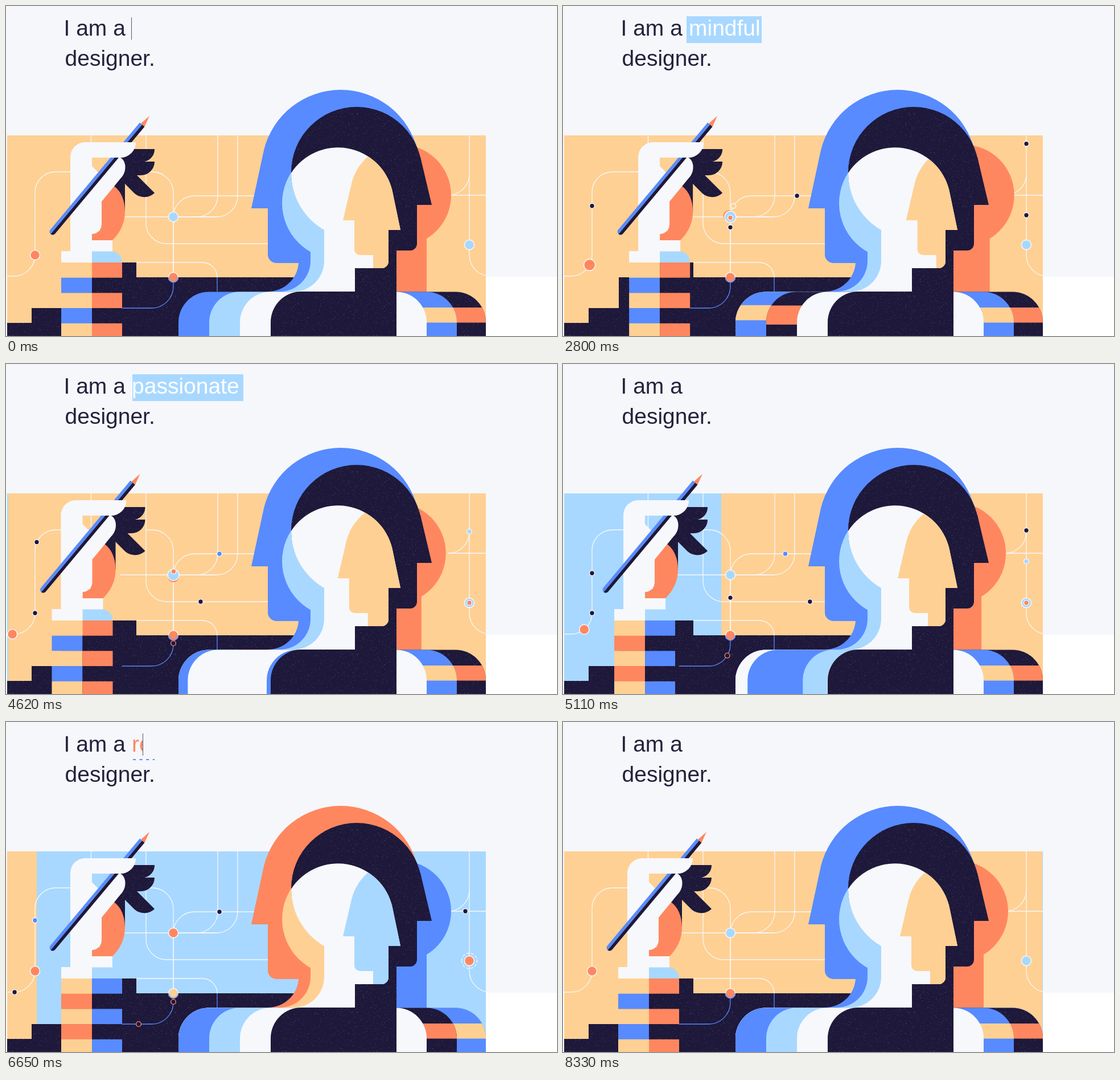
Animation of 968 by 579 pixels, one loop 8400 ms. Source, as an HTML page with a canvas:

```html
<!DOCTYPE html>
<html lang="en">
<head>
<meta charset="utf-8">
<title>I am a designer.</title>
<style>
html, body { margin: 0; width: 100%; height: 100%; overflow: hidden; background: #fff; }
canvas { display: block; }
</style>
</head>
<body>
<canvas id="stage" width="968" height="579"></canvas>
<script>
const ctx = document.getElementById('stage').getContext('2d');
const PAPER = '#f6f7fb', WHITE = '#f6f8fc', NAVY = '#1e183a', BLUE = '#578bff';
const CORAL = '#ff875f', PEACH = '#ffd093', SKY = '#a8d8ff';
const LOOP = 8400, STEP = 70;

const DAY = { bg: PEACH, hair: BLUE, head: SKY, back: CORAL, sleeve: [PEACH, BLUE, CORAL], nodes: [CORAL, SKY, CORAL, SKY] };
const SEA = { bg: SKY, hair: CORAL, head: PEACH, back: BLUE, sleeve: [PEACH, CORAL, BLUE], nodes: [CORAL, CORAL, PEACH, CORAL] };

// Navy with a light speckle
const GRAIN = (() => {
  const tile = document.createElement('canvas');
  tile.width = tile.height = 160;
  const g = tile.getContext('2d');
  let seed = 7;
  const rnd = () => (seed = (seed * 16807) % 2147483647) / 2147483647;
  g.fillStyle = NAVY;
  g.fillRect(0, 0, 160, 160);
  for (let i = 0; i < 1100; i++) {
    g.fillStyle = `rgba(205,190,205,${0.06 + rnd() * 0.2})`;
    g.fillRect(Math.floor(rnd() * 160), Math.floor(rnd() * 160), 1, 1);
  }
  return ctx.createPattern(tile, 'repeat');
})();

const linear = u => u;
const quad = u => u < 0.5 ? 2 * u * u : 1 - 2 * (1 - u) ** 2;
const progress = (t, start, span) => quad(Math.min(1, Math.max(0, (t - start) / span)));

// Value at t from a flat list: time, value, time, value ...
function track(t, keys, ease = linear) {
  if (t <= keys[0]) return keys[1];
  for (let i = 2; i < keys.length; i += 2) {
    if (t <= keys[i]) {
      const u = (t - keys[i - 2]) / (keys[i] - keys[i - 2]);
      return keys[i - 1] + (keys[i + 1] - keys[i - 1]) * ease(u);
    }
  }
  return keys[keys.length - 1];
}

const shapes = {};
const shape = d => shapes[d] || (shapes[d] = new Path2D(d));
function fill(color, d, rule = 'nonzero') { ctx.fillStyle = color; ctx.fill(shape(d), rule); }
function rect(color, x, y, w, h) { ctx.fillStyle = color; ctx.fillRect(x, y, w, h); }
function stroke(color, d, width = 1.3) { ctx.strokeStyle = color; ctx.lineWidth = width; ctx.stroke(shape(d)); }
function disc(color, x, y, r, edge, width = 1.5) {
  ctx.beginPath();
  ctx.arc(x, y, r, 0, 7);
  ctx.fillStyle = color;
  ctx.fill();
  if (edge) { ctx.strokeStyle = edge; ctx.lineWidth = width; ctx.stroke(); }
}

// Routes for the travelling dots
const ROUTES = {
  left: 'M150 291H87A36 36 0 0 0 51 327V437A37 37 0 0 1 14 474H-12',
  bend: 'M246 227V381A36 36 0 0 0 282 417H470',
  cross: 'M440 333H331A37 37 0 0 0 294 370V476',
  drop: 'M407 227V333A37 37 0 0 1 370 370H294',
  hook: 'M294 370V492A38 38 0 0 1 256 530H204',
  arm: 'M229 450H345A26 26 0 0 1 371 476V501',
  right: 'M814 227V437A37 37 0 0 0 851 474',
  side: 'M843 332H777'
};
const measured = {};
for (const name in ROUTES) {
  measured[name] = document.createElementNS('http://www.w3.org/2000/svg', 'path');
  measured[name].setAttribute('d', ROUTES[name]);
}
const at = (name, d) => measured[name].getPointAtLength(d);

// route, colour, then time and distance pairs
const DOTS = [
  ['left', NAVY, 1260, 0, 1820, 52, 3570, 215, 3800, 229.5, 5700, 229.5, 6650, 286.6, 6900, 305],
  ['left', 'hollow', 700, 40, 910, 70, 1820, 168.5, 2500, 229.5],
  ['left', NAVY, 3700, 0, 4620, 104.7, 5600, 214.5, 5750, 229.5],
  ['left', BLUE, 5400, 0, 6650, 140.5, 7500, 229.5],
  ['bend', NAVY, 3640, 0, 4620, 270.5, 5300, 398],
  ['cross', 'hollow', 1300, 0, 1820, 49, 3000, 167],
  ['cross', NAVY, 2500, 0, 3570, 103, 4200, 167],
  ['cross', BLUE, 4000, 97, 4620, 65, 5600, 34, 6100, 0],
  ['cross', NAVY, 6200, 0, 6650, 65, 7600, 167],
  ['drop', BLUE, 3000, 0, 3570, 55, 4100, 120],
  ['hook', NAVY, 2600, 0, 3570, 89, 3750, 106],
  ['hook', NAVY, 4700, 0, 5600, 88, 5800, 106],
  ['hook', 'ring', 4300, 106, 4620, 120, 5600, 165, 6650, 204.7, 7300, 233],
  ['hook', 'ring', 6400, 106, 6650, 121, 8300, 233],
  ['arm', NAVY, 700, 0, 1820, 116, 2450, 182],
  ['right', NAVY, 1400, 0, 1820, 38, 3300, 192],
  ['right', NAVY, 2650, 0, 3570, 90, 4500, 192],
  ['right', SKY, 4000, 0, 4620, 67, 5400, 150],
  ['right', NAVY, 4650, 0, 5600, 134, 6050, 192],
  ['side', BLUE, 5400, 0, 5600, 16, 6300, 66],
  ['side', NAVY, 6300, 0, 6650, 36, 7000, 66]
];
// Dots that rest inside the nodes
const INNER = [
  ['cross', CORAL, 1700, 167, 1820, 167, 3570, 170, 4620, 161, 5000, 167],
  ['right', CORAL, 4480, 192, 5200, 192]
];

function drawDots(list, t, p) {
  for (const [route, color, ...keys] of list) {
    if (t < keys[0] || t > keys[keys.length - 2]) continue;
    const { x, y } = at(route, track(t, keys));
    const face = color === 'hollow' ? p.bg : color === 'ring' ? NAVY : color;
    disc(face, x, y, 4.4, color === 'ring' ? CORAL : WHITE, 1.4);
  }
}

function drawNodes(t, p) {
  const [a, b, c, d] = p.nodes;
  const roll = track(t, [2550, 0, 3570, 74, 3800, 83, 4200, 83, 4620, 61, 5600, 5, 5750, 0]);
  const home = at('left', 229.5 + roll);
  disc(a, home.x, home.y, roll > 0 && roll < 20 ? 10 : 8.5, WHITE);
  const busy = t > 1700 && t < 5000;
  if (busy) {
    const turn = track(t, [1820, 90, 3570, 315, 4620, 450]) * Math.PI / 180;
    disc(CORAL, 294 + 3 * Math.cos(turn), 370 + 3 * Math.sin(turn), 10);
  }
  disc(b, 294, 370, busy ? 10 : 8.5, WHITE);
  disc(c, 294, 476, 8.5, WHITE);
  stroke(BLUE, 'M302.5 476A8.5 8.5 0 0 1 285.5 476', 1.5);
  disc(d, 814, 419, 8.5, WHITE);
  if (t > 6450 && t < 6950) {
    ctx.setLineDash([5, 3]);
    stroke(WHITE, 'M800.5 419A13.5 13.5 0 0 1 827.5 419A13.5 13.5 0 0 1 800.5 419');
    ctx.setLineDash([]);
  }
}

function drawLines() {
  stroke(WHITE, 'M2 474H14A37 37 0 0 0 51 437V327A36 36 0 0 1 87 291H150M149.5 227V300' +
    'M246 291H257A37 37 0 0 1 294 328V476M200 370H370' +
    'M372 227V333A37 37 0 0 1 335 370M814 295A37 37 0 0 1 777 332');
  for (const name of ['bend', 'cross', 'drop', 'right', 'side']) stroke(WHITE, ROUTES[name]);
}

// Sleeve bands slide out from behind the body: fill, stripe, target edge, start, span
const LEFT_BANDS = [
  [BLUE, 0, 303, -999, 1], [SKY, 0, 357, -999, 1], [WHITE, 0, 411, -999, 1],
  [WHITE, 0, 303, 750, 600],
  [BLUE, PEACH, 303, 1000, 650], [NAVY, CORAL, 357, 1060, 680], [WHITE, 0, 411, 1120, 680],
  [WHITE, 0, 303, 3868, 970],
  [BLUE, 0, 303, 4500, 820], [SKY, 0, 357, 4750, 800], [WHITE, 0, 411, 5050, 810]
];
const RIGHT_BANDS = [
  [NAVY, CORAL, 843, -999, 1], [BLUE, PEACH, 792, -999, 1], [WHITE, 0, 739, -999, 1],
  [WHITE, 0, 843, 4800, 1000],
  [BLUE, PEACH, 843, 5620, 800], [NAVY, CORAL, 792, 5700, 800], [WHITE, 0, 739, 5780, 800],
  [WHITE, 0, 843, 6800, 800],
  [NAVY, CORAL, 843, 7350, 750], [BLUE, PEACH, 792, 7430, 750], [WHITE, 0, 739, 7510, 750]
];

function drawBands(bands, from, dir, t) {
  for (const [color, stripe, target, start, span] of bands) {
    if (t <= start) continue;
    const edge = from + (target - from) * progress(t, start, span);
    const r = 53.5;
    ctx.save();
    ctx.beginPath();
    ctx.moveTo(from - dir * 60, 579);
    ctx.lineTo(from - dir * 60, 501.5);
    ctx.lineTo(edge - dir * r, 501.5);
    ctx.arc(edge - dir * r, 501.5 + r, r, -Math.PI / 2, dir > 0 ? 0 : Math.PI, dir < 0);
    ctx.lineTo(edge, 579);
    ctx.clip();
    rect(color === NAVY ? GRAIN : color, 280, 500, 570, 80);
    if (stripe) {
      const lift = dir < 0 && stripe === PEACH ? track(t, [2700, 0, 3570, 36, 3850, 60]) : 0;
      const grow = dir < 0 && stripe === CORAL ? track(t, [2700, 0, 3500, 28]) : 0;
      rect(stripe, 280, 529 - lift - grow, 570, 26.5 + 2 * grow);
    }
    ctx.restore();
  }
}

function drawHead(p, lean) {
  fill(p.hair, 'M431 355L453.1 252.6A139 139 0 0 1 722.9 252.6L616 400L560 451V501H460A54 54 0 0 0 514 451H475A15 15 0 0 1 460 436V355Z');
  disc(p.head, 583, 346, 98);
  fill(p.head, 'M535 420V447A54 54 0 0 1 481 501H613V420Z');
  disc(GRAIN, 616, 292, 115);
  fill(GRAIN, 'M616 292L728 265L748 349H722V417A12 12 0 0 1 710 429H686V502H613V400Z');
  const face = 'M501 293A98 98 0 0 1 678.6 324L693 393H672V448A12 12 0 0 1 660 460H613V501H505A54 54 0 0 0 559 447V393A115 115 0 0 1 501 293Z';
  fill(WHITE, face);
  ctx.save();
  ctx.clip(shape(face));
  ctx.translate(lean, 0);
  fill(p.bg, 'M693.3 243.3A88.7 88.7 0 0 0 606.8 312.5L592 376H612V427A10 10 0 0 0 622 437H645V460H710V243Z');
  ctx.restore();
}

function drawHand(p, shift) {
  ctx.save();
  ctx.translate(shift, 0);
  const [pale, mid, dark] = p.sleeve;
  for (let i = 0; i < 5; i++) {
    const y = 450 + i * 26.7;
    rect(i % 2 ? mid : pale, 97, y, 54, 27);
    rect(i % 2 ? GRAIN : dark, 151, y, 53, 27);
  }
  fill(SKY, 'M151 430H184A20 20 0 0 1 204 450H151Z');
  fill(GRAIN, 'M196 266L222 251H261A22 22 0 0 1 243 273H261A24 24 0 0 1 237 297H230L261 328A26 26 0 0 1 226 329L209 312V361L190 316L200 280Z');
  fill(CORAL, 'M190 316C203 326 209 342 209 361C209 382 200 398 187 411H151V395H165V340Z');
  rect(WHITE, 97, 430, 54, 20);
  rect(WHITE, 150, 411, 37, 19.5);
  fill(WHITE, 'M113 431V265A26 26 0 0 1 139 239H228A27 27 0 0 1 201 266C211 271 212 288 205 298L168 343V383A17 17 0 0 1 151 400V431ZM151 266H190L163 293L151 281Z', 'evenodd');
  ctx.save();
  ctx.translate(82, 396);
  ctx.rotate(-0.874);
  fill(BLUE, 'M0 -5.5H245V0H-5.5A5.5 5.5 0 0 1 0 -5.5Z');
  fill(NAVY, 'M-5.5 0H245V5.5H0A5.5 5.5 0 0 1 -5.5 0Z');
  fill(CORAL, 'M245 -3L265 0L245 5.5Z');
  ctx.restore();
  fill(WHITE, 'M139 239H228A27 27 0 0 1 201 266H151Z');
  ctx.restore();
}

function drawScene(p, x0, x1, t) {
  if (x1 <= x0) return;
  const shift = track(t, [150, 0, 900, -13, 1050, -13, 1750, 0, 1900, 0, 3000, 20.5, 3600, 20.5,
    4500, -16.5, 4650, -16.5, 5500, 0, 7300, 0, 7850, -16.5, 8300, 0], quad);
  const lean = shift * 0.56;
  ctx.save();
  ctx.beginPath();
  ctx.rect(x0, 0, x1 - x0, 579);
  ctx.clip();
  rect(p.bg, 2, 227, 841, 352);
  drawLines();
  disc(p.back, 693.3 + lean, 332, 88.7);
  rect(p.back, 680, 395, 59 + lean, 110);
  fill(GRAIN, 'M2 579V556H45V530H98V476H160V450H229V476H515V579Z');
  stroke(WHITE, 'M229 450H345A26 26 0 0 1 371 476');
  stroke(BLUE, 'M371 476V501M294 476V492A38 38 0 0 1 256 530H204');
  drawDots(DOTS, t, p);
  drawNodes(t, p);
  drawDots(INNER, t, p);
  drawHead(p, lean);
  drawBands(LEFT_BANDS, 465, -1, t);
  drawBands(RIGHT_BANDS, 686, 1, t);
  fill(GRAIN, 'M686 579V460H613V501H519A54 54 0 0 0 465 555V579Z');
  drawHand(p, shift);
  ctx.restore();
}

const WORD_X = 221;
function text(str, x, y, color) { ctx.fillStyle = color; ctx.fillText(str, x, y); }

function clipped(x, y, w, h, draw) {
  if (w <= 0 || h <= 0) return;
  ctx.save();
  ctx.beginPath();
  ctx.rect(x, y, w, h);
  ctx.clip();
  draw();
  ctx.restore();
}

function typed(word, color, t, from, to, keys) {
  if (t < from || t > to) return;
  const w = track(t, keys);
  clipped(WORD_X, 10, w, 60, () => text(word, WORD_X, 52, color));
}

function highlight(word, x0, x1, t, inKeys, outKeys) {
  const top = track(t, outKeys), bottom = track(t, inKeys);
  clipped(x0, 18 + top, x1 - x0, bottom - top, () => {
    rect(SKY, x0, 18, x1 - x0, 47);
    text(word, WORD_X, 52, '#fff');
  });
}

function cursor(t, from, to, keys) {
  if (t >= from && t < to) rect('#55556a', WORD_X - 1 + track(t, keys), 20, 1, 39);
}

function drawText(t) {
  ctx.font = '39px "Liberation Sans", Arial, Helvetica, sans-serif';
  text('I am a', 101.5, 52, '#25213c');
  text('designer.', 103.5, 105, '#25213c');

  const first = [150, 0, 550, 126, 1150, 126, 1500, 0];
  const second = [3362, 0, 3570, 99, 3760, 190];
  const third = [5395, 0, 5600, 91, 5830, 194, 6440, 194, 6650, 20, 6675, 0];
  typed('mindful', '#9dd3ff', t, 150, 1500, first);
  typed('passionate', '#9dd3ff', t, 3362, 4420, second);
  typed('resourceful', CORAL, t, 5395, 6675, third);
  cursor(t, 0, 1650, first);
  cursor(t, 3200, 4100, second);
  cursor(t, 5250, 6750, third);

  const rule = track(t, [5450, 0, 5600, 65, 5900, 193, 6440, 193, 6650, 38, 6700, 0]);
  clipped(223, 60, rule, 10, () => {
    ctx.setLineDash([5, 6.6]);
    stroke(BLUE, 'M223 66H420', 2);
    ctx.setLineDash([]);
  });

  highlight('mindful', 217, 349, t, [1780, 0, 1820, 11, 1950, 47], [2850, 0, 3000, 47]);
  highlight('passionate', 222, 417, t, [4280, 0, 4420, 47], [4900, 0, 5050, 47]);
  highlight('mindful', 217, 349, t, [7000, 0, 7140, 47], [8150, 0, 8300, 47]);
}

function frame() {
  const t = Math.floor(performance.now() % LOOP / STEP) * STEP;
  rect('#fff', 0, 0, 968, 579);
  rect(PAPER, 0, 0, 968, 475);
  // A palette wipe runs across the picture, later a second one back
  if (t < 6400) {
    const x = Math.round(2 + 841 * progress(t, 4575, 1320));
    drawScene(SEA, 2, x, t);
    drawScene(DAY, x, 843, t);
  } else {
    const x = Math.round(2 + 840 * progress(t, 6418, 1320));
    drawScene(DAY, 2, x, t);
    drawScene(SEA, x, 843, t);
  }
  drawText(t);
  requestAnimationFrame(frame);
}
frame();
</script>
</body>
</html>
```
